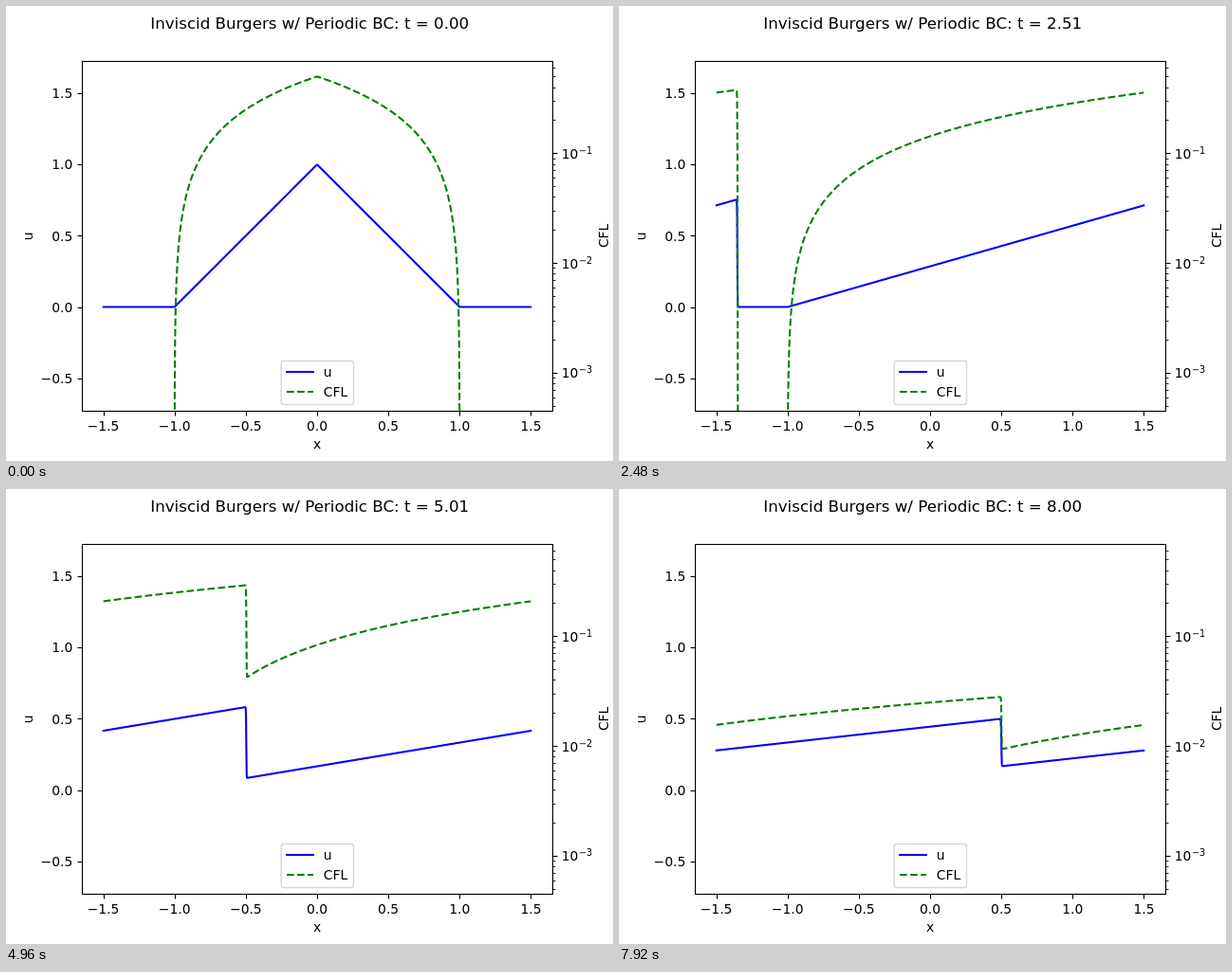
Recreate the animation shown at these times as an HTML page with a canvas. Size 640 by 480 pixels, loop 8 s.

```html
<!DOCTYPE html>
<html>
<head>
<meta charset="utf-8">
<style>
  html, body { margin: 0; width: 100%; height: 100%; overflow: hidden; background: #fff; }
  canvas { display: block; }
</style>
</head>
<body>
<canvas id="stage" width="640" height="480"></canvas>
<script>
const ctx = document.getElementById('stage').getContext('2d');
const FRAMES = 100, FRAME_MS = 80, T_END = 8;
const N = 1200, DX = 3 / N, SUBSTEPS = 65;
const DT = T_END / (FRAMES - 1) / SUBSTEPS;
const BOX = { l: 80, r: 576, t: 57.6, b: 427.2 };
const CURVE_WIDTH = 2.083, DASH = [7.708, 3.333];

const px = x => 328 + x * 150.303;
const py = u => 317.55 - u * 150.303;
const logY = c => 155.3 - 115.8 * (c > 0 ? Math.log10(c) + 1 : -1000);
const cellX = i => -1.5 + (i + 0.5) * DX;
const snap = v => Math.round(v) + 0.5;

// Second-order upwind solver for u_t + (u²/2)_x = 0 on a periodic grid, u >= 0
const minmod = (a, b) => a * b <= 0 ? 0 : Math.abs(a) < Math.abs(b) ? a : b;
const flux = new Float64Array(N);

function advance(u, out) {
  for (let i = 0; i < N; i++) {
    const left = u[i ? i - 1 : N - 1], right = u[i < N - 1 ? i + 1 : 0];
    const face = u[i] + minmod(u[i] - left, right - u[i]) / 2;
    flux[i] = face * face / 2;
  }
  for (let i = 0; i < N; i++) out[i] = u[i] - DT / DX * (flux[i] - flux[i ? i - 1 : N - 1]);
}

function solve() {
  const u = Float64Array.from({ length: N }, (_, i) => Math.max(0, 1 - Math.abs(cellX(i))));
  const a = new Float64Array(N), b = new Float64Array(N);
  const states = [u.slice()];
  while (states.length < FRAMES) {
    for (let s = 0; s < SUBSTEPS; s++) {
      advance(u, a);
      advance(a, b);
      for (let i = 0; i < N; i++) u[i] = (u[i] + b[i]) / 2;
    }
    states.push(u.slice());
  }
  return states;
}
const states = solve();

function line(x1, y1, x2, y2, width = 1.111) {
  ctx.lineWidth = width;
  ctx.beginPath();
  ctx.moveTo(x1, y1);
  ctx.lineTo(x2, y2);
  ctx.stroke();
}

function text(str, x, y, align = 'center', size = 13.889) {
  ctx.font = `${size}px "DejaVu Sans", sans-serif`;
  ctx.textAlign = align;
  ctx.fillText(str, x, y);
}

function sideways(str, x, y) {
  ctx.save();
  ctx.translate(x, y);
  ctx.rotate(-Math.PI / 2);
  text(str, 0, 0);
  ctx.restore();
}

// Polyline cut at the lower canvas edge, so dashes restart where it re-enters
function curve(values, toY, color, dash) {
  const floor = 481;
  ctx.beginPath();
  let x0, y0;
  values.forEach((v, i) => {
    const x = px(cellX(i)), y = toY(v);
    if (i === 0) {
      if (y <= floor) ctx.moveTo(x, y);
    } else if (y <= floor || y0 <= floor) {
      const cut = x0 + (x - x0) * (floor - y0) / (y - y0);
      if (y0 > floor) ctx.moveTo(cut, floor);
      if (y > floor) ctx.lineTo(cut, floor);
      else ctx.lineTo(x, y);
    }
    x0 = x;
    y0 = y;
  });
  ctx.strokeStyle = color;
  ctx.lineWidth = CURVE_WIDTH;
  ctx.lineJoin = 'round';
  ctx.lineCap = dash.length ? 'butt' : 'square';
  ctx.setLineDash(dash);
  ctx.stroke();
  ctx.setLineDash([]);
  ctx.lineCap = 'butt';
}

function drawAxes() {
  ctx.strokeStyle = ctx.fillStyle = '#000';
  ctx.lineWidth = 1.111;
  ctx.lineJoin = 'miter';
  ctx.strokeRect(80.5, 58.5, 496, 369);
  const label = v => v.toFixed(1).replace('-', '\u2212');
  for (let v = -1.5; v <= 1.5; v += 0.5) {
    const x = snap(px(v));
    line(x, 427.5, x, 432.5);
    text(label(v), px(v), 448);
    if (v < -0.5) continue;
    const y = snap(py(v));
    line(75.5, y, 80.5, y);
    text(label(v), 70.3, Math.round(py(v) + 5.2), 'right');
  }
  for (let e = -4; e < 0; e++) {
    for (let m = 1; m < 10; m++) {
      const yc = logY(m * 10 ** e), y = snap(yc);
      if (yc < BOX.t || yc > BOX.b) continue;
      if (m > 1) {
        line(576.5, y, 579.5, y, 0.833);
        continue;
      }
      line(576.5, y, 581.5, y);
      const base = Math.round(yc + 5.5);
      text('10', 585.7, base, 'left');
      text('\u2212' + -e, 603.9, base - 5, 'left', 9.722);
    }
  }
  text('x', 328, 467);
  sideways('u', 28, 242.9);
  sideways('CFL', 635, 242.4);
}

function drawLegend() {
  ctx.beginPath();
  ctx.roundRect(290.2, 374.5, 76.3, 46, 2.8);
  ctx.fillStyle = 'rgba(255,255,255,0.8)';
  ctx.fill();
  ctx.strokeStyle = 'rgba(204,204,204,0.8)';
  ctx.lineWidth = 1.389;
  ctx.stroke();
  ctx.strokeStyle = '#00f';
  line(295, 386, 325, 386, CURVE_WIDTH);
  ctx.strokeStyle = '#008000';
  ctx.setLineDash(DASH);
  line(296, 407, 324, 407, CURVE_WIDTH);
  ctx.setLineDash([]);
  ctx.fillStyle = '#000';
  text('u', 334.8, 391, 'left');
  text('CFL', 334.8, 412, 'left');
}

function draw() {
  const n = Math.floor(performance.now() / FRAME_MS) % FRAMES;
  const u = states[n];
  // The closing time step is much shorter, so its CFL number drops
  const courant = n === FRAMES - 1 ? 0.056 : 0.5;
  ctx.fillStyle = '#fff';
  ctx.fillRect(0, 0, 640, 480);

  ctx.save();
  ctx.beginPath();
  ctx.rect(BOX.l, BOX.t, BOX.r - BOX.l, BOX.b - BOX.t);
  ctx.clip();
  curve(u, py, '#00f', []);
  curve(u, v => logY(courant * v), '#008000', DASH);
  ctx.restore();

  drawAxes();
  drawLegend();
  const t = (n * T_END / (FRAMES - 1)).toFixed(2);
  text(`Inviscid Burgers w/ Periodic BC: t = ${t}`, 320.2, 24, 'center', 16.667);
  requestAnimationFrame(draw);
}
draw();
</script>
</body>
</html>
```
